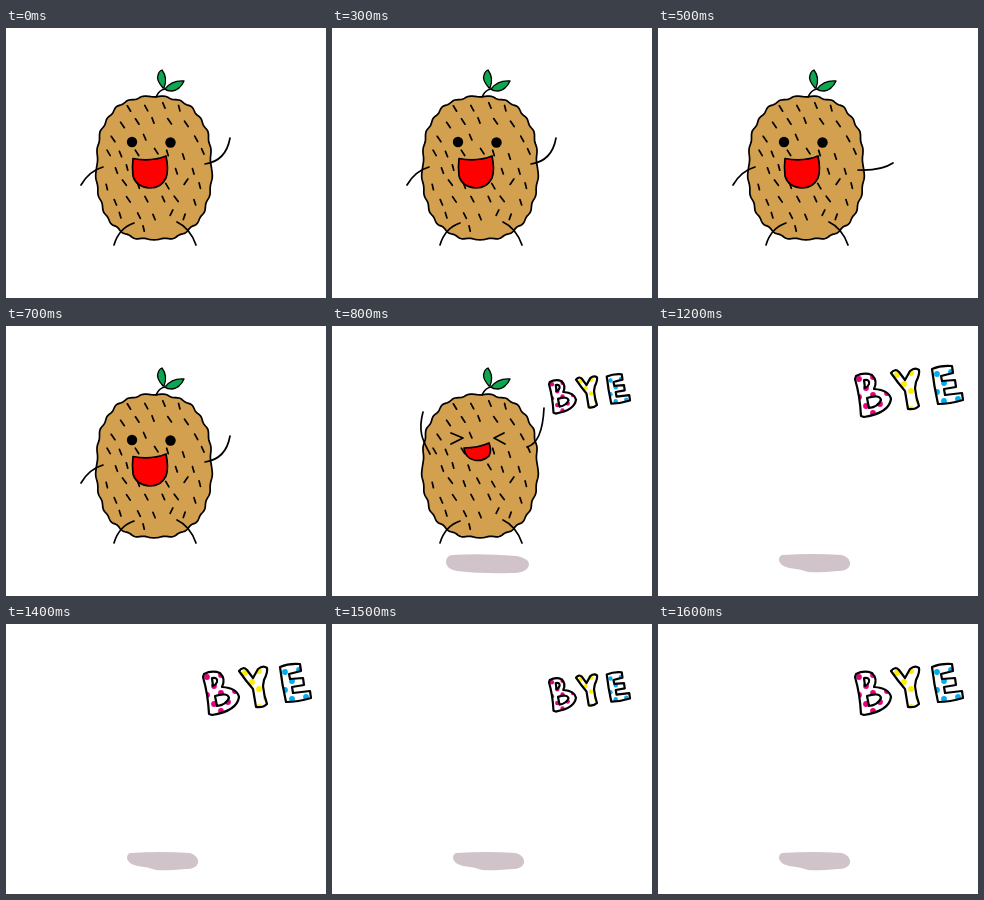
Animation of 320x270 px, one loop 1700 ms. Source, as an HTML page:

```html
<!DOCTYPE html>
<html lang="en">
<head>
<meta charset="utf-8">
<title>Bye</title>
<style>
  html, body { margin: 0; width: 100%; height: 100%; overflow: hidden; background: #fff; }
  svg { display: block; width: 100vw; height: 100vh; }
  .ink { fill: none; stroke: #000; stroke-width: 1.7; stroke-linecap: round; stroke-linejoin: round; }
  .letter { stroke-width: 2.2; stroke-linejoin: round; vector-effect: non-scaling-stroke; }
</style>
</head>
<body>
<svg viewBox="0 0 320 270">
  <defs>
    <path id="b" class="letter" fill-rule="evenodd" clip-rule="evenodd" d="M198 50Q206 46 214 49Q220 55 216 63Q231 64 233 73Q231 87 206 91L203 90Q202 70 197 53ZM206 54Q212 53 211 58Q210 61 207 62ZM209 72Q222 68 223 74Q220 81 211 82Z"/>
    <path id="y" class="letter" d="M233 47Q237 42 241 46L247 54L252 45Q257 41 261 44Q262 48 258 56L257 62Q258 72 261 80Q257 84 250 83L247 65Q240 57 233 47Z"/>
    <path id="e" class="letter" d="M274 43Q283 39 294 40L295 47L283 50L284 55L297 54L298 61L286 63L287 69L304 67L305 74Q292 78 280 78Q276 60 274 43Z"/>
    <clipPath id="letters"><use href="#b"/><use href="#y"/><use href="#e"/></clipPath>
  </defs>

  <g fill="#d0c4ca">
    <path id="nearShadow" d="M120 229Q150 227 185 230Q198 233 197 239Q195 247 180 247Q150 248 125 245Q114 243 114 236Q114 230 120 229Z"/>
    <path id="farShadow" d="M124 229Q155 227 184 229Q193 232 192 239Q190 245 180 245Q160 247 150 246Q142 243 131 242Q121 239 121 234Q121 230 124 229Z"/>
  </g>

  <g id="kiwi" class="ink">
    <path id="body" fill="#d2a04f"/>
    <path id="hair"/>
    <path d="M150 69Q153 62 159 61"/>
    <g fill="#0da651" stroke-width="1.3">
      <path d="M157 60Q150 52 152 47Q153 43 156 42Q162 50 158 60Z"/>
      <path d="M159 61Q166 52 178 53Q174 62 166 63Q161 63 159 61Z"/>
    </g>
    <path d="M128 195Q113 200 108 217M171 194Q184 200 190 217"/>
    <g id="calm">
      <g fill="#000" stroke="none"><circle cx="126" cy="114" r="5.2"/><circle cx="164.5" cy="114.5" r="5.2"/></g>
      <path fill="#f00" d="M127 130.5Q145 134 160 128Q163 142 160 150Q155 160 144 160Q130 159 127 148Q126 138 127 130.5Z"/>
      <path d="M97 139Q83 143 75 157"/>
      <path id="armUp" d="M199 136Q220 133 224 110"/>
      <path id="armOut" d="M200 142Q223 143 235 135"/>
    </g>
    <g id="joy">
      <path d="M119 107L131 112L119 118M172 107L162 112L173 118"/>
      <path fill="#f00" d="M132 122Q146 122 157 117Q160 124 157 130Q150 136 142 134Q133 132 132 122Z"/>
      <path d="M98 128C93 118 85 108 91 86M195 121C206 118 211 104 212 82"/>
    </g>
  </g>

  <g id="word">
    <g fill="#fff"><use href="#b"/><use href="#y"/><use href="#e"/></g>
    <g id="dots" clip-path="url(#letters)"></g>
    <g fill="none" stroke="#000"><use href="#b"/><use href="#y"/><use href="#e"/></g>
  </g>
</svg>
<script>
const $ = id => document.getElementById(id);

let seed = 7;
const random = () => (seed = seed * 16807 % 2147483647) / 2147483647;
const jitter = size => (random() - .5) * size;

// The body is a superellipse with a gently wavy edge
const CX = 148, CY = 140, RX = 57.5, RY = 71.5, POWER = 2.45;
const bend = v => Math.sign(v) * Math.abs(v) ** (2 / POWER);
function bodyPath() {
  const points = [];
  for (let i = 0; i < 240; i++) {
    const a = i / 240 * 2 * Math.PI;
    const wave = .7 * Math.sin(25 * a) + .4 * Math.sin(11 * a);
    const x = CX + (RX + wave) * bend(Math.cos(a));
    const y = CY + (RY + wave) * bend(Math.sin(a));
    points.push(x.toFixed(1) + ' ' + y.toFixed(1));
  }
  return 'M' + points.join('L') + 'Z';
}
const inside = (x, y) => Math.abs((x - CX) / RX) ** POWER + Math.abs((y - CY) / RY) ** POWER < .78;
const nearEye = (x, y) => Math.hypot(Math.abs(x - 145) - 19, y - 114) < 10;

// Short hairs on a loose staggered grid
function hairPath() {
  let d = '';
  for (let row = 0; row < 9; row++) {
    for (let col = 0; col < 8; col++) {
      const x = 92 + col * 16 + row % 2 * 8 + jitter(6);
      const y = 79 + row * 15.5 + jitter(6);
      const flip = x > 150 && y > 150 && random() < .35;
      const dx = (flip ? -1 : 1) * (1.3 + jitter(1.4));
      if (inside(x, y) && !nearEye(x, y)) d += `M${x - dx} ${y - 2.7}L${x + dx} ${y + 2.7}`;
    }
  }
  return d;
}

function addDots(left, top, color) {
  for (let row = 0; row < 5; row++) {
    for (let col = 0; col < 3; col++) {
      const x = left + col * 14 + row % 2 * 7, y = top + row * 9 - col * 2;
      $('dots').insertAdjacentHTML('beforeend', `<circle cx="${x}" cy="${y}" r="2.9" fill="${color}"/>`);
    }
  }
}

$('body').setAttribute('d', bodyPath());
$('hair').setAttribute('d', hairPath());
addDots(201, 53, '#e6007e');
addDots(239, 49, '#ffed00');
addDots(279, 48, '#00aeef');

const LOOP = 1700, JUMP = 800, FLY = 1000, GONE = 1100;
const show = (id, on) => { $(id).style.display = on ? '' : 'none'; };

function draw(t) {
  const jump = t >= JUMP, flying = t >= FLY;
  const up = Math.floor((t + 100) / 200) % 2 === 0;
  const big = t > GONE && Math.floor(t / 100) % 2 === 0;
  show('kiwi', t < GONE);
  show('calm', !jump);
  show('joy', jump);
  show('armUp', up);
  show('armOut', !up);
  show('nearShadow', jump && !flying);
  show('farShadow', flying);
  show('word', jump);
  $('kiwi').setAttribute('transform', `translate(0 ${flying ? -190 : 0})`);
  $('word').setAttribute('transform', big ? '' : 'translate(217 47.5) scale(.75 .77) translate(-197 -39)');
}

function tick(now) {
  draw(now % LOOP);
  requestAnimationFrame(tick);
}
draw(0);
requestAnimationFrame(tick);
</script>
</body>
</html>
```
